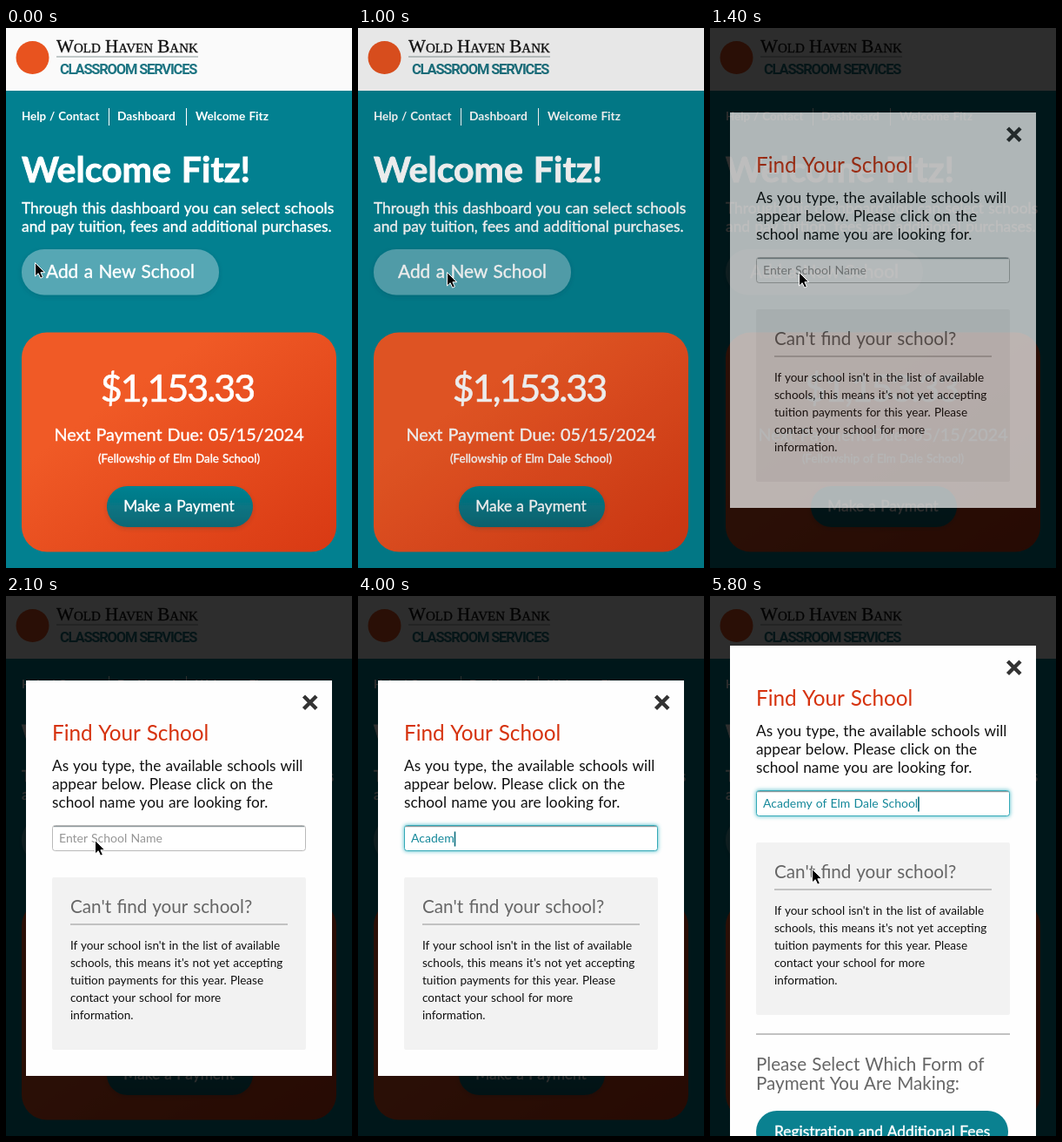
Animation, 398 px wide and 620 px high, one loop 5900 ms. Source, as an HTML page:

```html
<!DOCTYPE html>
<html lang="en">
<head>
<meta charset="utf-8">
<title>School payment dashboard</title>
<style>
html, body { margin: 0; width: 100%; height: 100%; overflow: hidden; background: #028090; }
svg { display: block; width: 398px; height: 620px; }
text { font-family: Lato, "Open Sans", sans-serif; word-spacing: .05em; white-space: pre; }
.bold { font-weight: 700; }
.title { font-weight: 700; stroke: #fff; stroke-width: .9; }
.firm { stroke: #fff; stroke-width: .4; }
.bank { font-family: "Liberation Serif", serif; font-variant: small-caps; word-spacing: 0; stroke: #111; stroke-width: .3; }
.unit { font-family: Roboto, sans-serif; font-weight: 700; letter-spacing: -1.2px; word-spacing: 0; }
.amount { letter-spacing: -2px; stroke: #fff; stroke-width: .7; }
</style>
</head>
<body>
<svg id="stage" viewBox="0 0 398 620">
  <defs>
    <linearGradient id="orange" x1="0" y1="0" x2="1" y2="1">
      <stop offset=".3" stop-color="#f05a26"/><stop offset="1" stop-color="#d83913"/>
    </linearGradient>
    <linearGradient id="teal" x1="0" y1="0" x2="0" y2="1">
      <stop offset="0" stop-color="#038291"/><stop offset="1" stop-color="#0b6875"/>
    </linearGradient>
    <filter id="soft" x="-20%" y="-40%" width="140%" height="200%">
      <feDropShadow dx="0" dy="2" stdDeviation="2.5" flood-color="#003640" flood-opacity=".2"/>
    </filter>
    <filter id="glow" x="-10%" y="-50%" width="120%" height="200%">
      <feGaussianBlur stdDeviation="2.2"/>
    </filter>
  </defs>
  <g id="page"></g>
  <rect id="shade" width="398" height="620" fill="#000"/>
  <g id="modal"></g>
  <path id="cursor" d="M0 0V15.5L3.7 12.2L6.2 17.7L8.9 16.5L6.4 11.2H11.2Z"
    fill="#000" stroke="#fff" stroke-width="1"/>
</svg>
<script>
const LOOP = 5900;
const SCHOOL = "Academy of Elm Dale School";
const TEAL = "#14889a";
const $ = id => document.getElementById(id);

const text = (x, y, size, content, fill = "#fff", extra = "") =>
  `<text x="${x}" y="${y}" font-size="${size}" fill="${fill}" ${extra}>${content}</text>`;
const rect = (x, y, w, h, r, fill, extra = "") =>
  `<rect x="${x}" y="${y}" width="${w}" height="${h}" rx="${r}" fill="${fill}" ${extra}/>`;
const lines = (x, y, step, size, rows, fill, extra) =>
  rows.map((row, i) => text(x, y + i * step, size, row, fill, extra)).join("");

const bold = 'class="bold"', firm = 'class="firm"';
const centred = 'text-anchor="middle"';

$("page").innerHTML =
  rect(0, 0, 398, 620, 0, "#028090") +
  rect(0, 0, 398, 72, 0, "#fafafa") +
  '<circle cx="30.5" cy="34" r="19" fill="#e8531f"/>' +
  text(58, 28, 21.1, "Wold Haven Bank", "#111", 'class="bank"') +
  rect(58, 32.5, 163, 1, 0, "#8a9a9a") +
  text(62, 53, 16.5, "CLASSROOM SERVICES", "#1c7482", 'class="unit"') +
  text(18, 106, 13.4, "Help / Contact", "#fff", bold) +
  text(128, 106, 13.8, "Dashboard", "#fff", bold) +
  text(218, 106, 13.7, "Welcome Fitz", "#fff", bold) +
  rect(118, 92, 1, 20, 0, "#fff") + rect(207, 92, 1, 20, 0, "#fff") +
  text(18, 177, 41, "Welcome Fitz!", "#fff", 'class="title"') +
  lines(18, 213, 21, 17.4, [
    "Through this dashboard you can select schools",
    "and pay tuition, fees and additional purchases."], "#fff", firm) +
  rect(18, 254, 227, 52.5, 26, "#57a7b4", 'filter="url(#soft)"') +
  text(46, 287, 20.9, "Add a New School", "#fff", firm) +
  rect(18, 349.5, 362, 252, 29, "url(#orange)") +
  text(197, 429, 43, "$1,153.33", "#fff", centred + ' class="amount"') +
  text(199, 474, 19.8, "Next Payment Due: 05/15/2024", "#fff", centred + " " + firm) +
  text(199, 499, 13.4, "(Fellowship of Elm Dale School)", "#fff", centred + " " + firm) +
  rect(116, 526, 168, 47, 23.5, "url(#teal)", 'filter="url(#soft)"') +
  text(199, 555, 17.3, "Make a Payment", "#fff", centred + " " + firm);

$("modal").innerHTML =
  '<rect id="panel" x="23" y="97" width="352" fill="#fefefe"/>' +
  '<path d="M342.5 115L357 129.5M357 115L342.5 129.5" stroke="#333" stroke-width="4.4"/>' +
  text(53, 166, 24.3, "Find Your School", "#d6330f") +
  lines(53, 201, 21, 17.25, [
    "As you type, the available schools will",
    "appear below. Please click on the",
    "school name you are looking for."], "#111") +
  rect(52.5, 262.5, 293, 31, 4, "#39b6c4", 'id="halo" filter="url(#glow)"') +
  rect(53.5, 263.5, 291, 29, 3, "#fff", 'id="field"') +
  rect(55, 264, 288, 1.2, 0, "#8f9a9d") +
  text(61, 283, 14, "Enter School Name", "#969696", 'id="hint"') +
  text(61, 283, 14, "", TEAL, 'id="typed"') +
  rect(0, 270.5, 1.6, 17, 0, "#096c7c", 'id="caret"') +
  rect(53, 323, 292, 198, 2, "#f2f2f2") +
  text(74, 364, 20.7, "Can't find your school?", "#666") +
  rect(74, 376, 250, 2, 0, "#c2c2c2") +
  lines(74, 406, 20, 13.55, [
    "If your school isn't in the list of available",
    "schools, this means it's not yet accepting",
    "tuition payments for this year. Please",
    "contact your school for more",
    "information."], "#111") +
  `<g id="option">${rect(53.5, 293.5, 291, 39, 0, "#fff", 'stroke="#c8c8c8"')}${
    text(61, 318, 14, SCHOOL, "#444")}</g>` +
  `<g id="more">${rect(53, 542, 292, 2, 0, "#c2c2c2")}${
    lines(53, 585, 22, 20.6, ["Please Select Which Form of", "Payment You Are Making:"], "#666")}${
    rect(53, 631, 290, 48, 24, "#0a8190")}${
    text(74, 660.5, 17.4, "Registration and Additional Fees", "#fff", firm)}</g>`;

const clamp = v => Math.min(1, Math.max(0, v));
const progress = (t, from, to) => clamp((t - from) / (to - from));
const smooth = p => p * p * (3 - 2 * p);
const mix = (a, b, p) => a + (b - a) * p;
const show = (id, on) => $(id).setAttribute("visibility", on ? "inherit" : "hidden");
const set = (id, name, value) => $(id).setAttribute(name, value);

function typedText(t, chosen) {
  if (chosen) return SCHOOL;
  return t < 2900 ? "" : SCHOOL.slice(0, Math.min(10, 1 + Math.floor((t - 2900) / 200)));
}

function cursorAt(t) {
  if (t < 2900) {
    const p = smooth(progress(t, 0, 800));
    return [mix(33.5, 102.5, p), mix(269.5, 280.5, p)];
  }
  const p = smooth(progress(t, 4700, 5300));
  return [mix(140, 117.5, p), mix(530, 313.5, p)];
}

function draw(time) {
  const t = Math.floor(time / 100) * 100;
  const chosen = t >= 5800;
  const focus = progress(t, 2300, 2600);
  const typed = typedText(t, chosen);

  set("shade", "opacity", .82 * smooth(progress(t, 950, 1220)));
  set("modal", "opacity", 1 - (1 - progress(t, 1200, 1700)) ** 2.3);
  set("modal", "transform", `translate(0 ${chosen ? -40 : 0})`);
  set("panel", "height", chosen ? 600 : 454);
  show("more", chosen);
  show("option", t >= 4300 && !chosen);

  set("halo", "opacity", focus * .75);
  set("field", "stroke", focus > .5 ? "#35a9b7" : "#b9b9b9");
  show("hint", !typed);
  $("typed").textContent = typed;
  show("caret", focus > .5);
  set("caret", "x", 61 + (typed ? $("typed").getComputedTextLength() : 0));

  show("cursor", t < 2900 || t >= 4700);
  set("cursor", "transform", `translate(${cursorAt(t)})`);
}

const start = performance.now();
function tick() {
  draw((performance.now() - start) % LOOP);
  requestAnimationFrame(tick);
}
tick();
</script>
</body>
</html>
```
